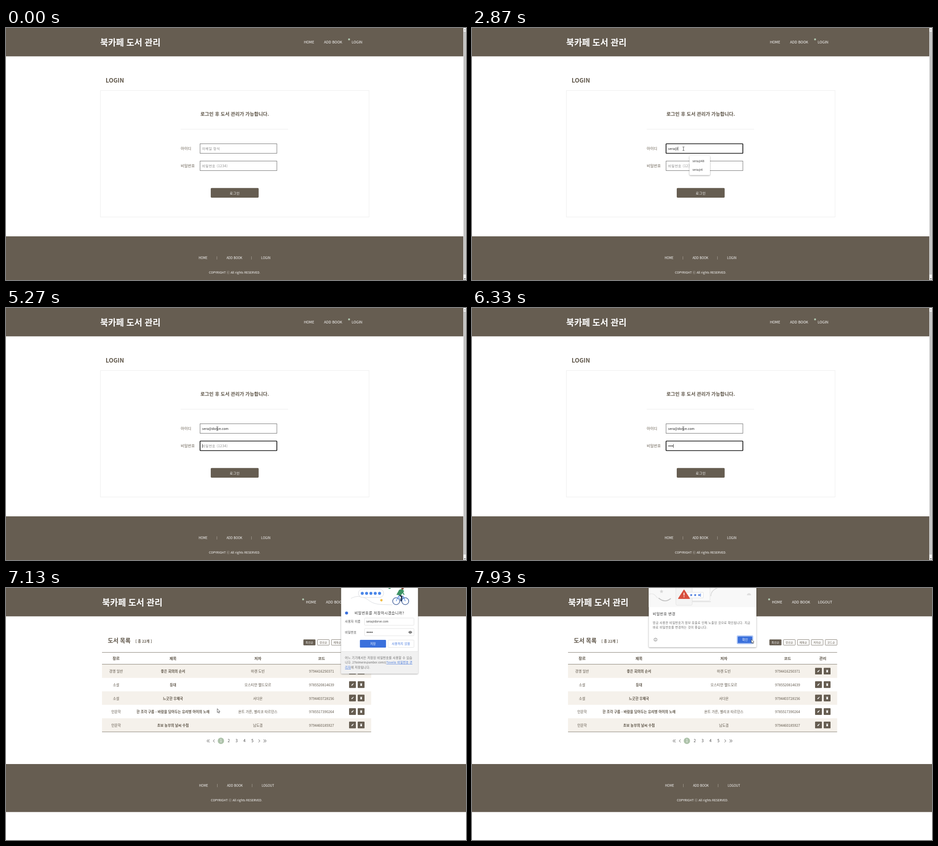
These frames come from a looping animation (1011 by 554 pixels, 8 s). An HTML page:

```html
<!DOCTYPE html>
<html lang="ko">
<head>
<meta charset="utf-8">
<title>북카페 도서 관리</title>
<style>
html, body { margin: 0; width: 100%; height: 100%; overflow: hidden; background: #fff; }
svg { display: block; width: 100%; height: 100%; }
text { font-family: "Noto Sans CJK KR", "Noto Sans CJK", "Noto Sans", sans-serif; white-space: pre; }
.popup { filter: drop-shadow(0 1px 1.5px #0006); }
</style>
</head>
<body>
<svg id="stage" viewBox="0 0 1011 554" xmlns="http://www.w3.org/2000/svg"></svg>
<script>
const BROWN = '#665d51', INK = '#5d5447', GREEN = '#aec3ab', BLUE = '#3a70dc', GRAY = '#666';
const LOOP = 8000, LOGIN_END = 6600;
const EMAIL = 'sera@dorve.com';

// y is the vertical middle of the glyphs
const text = (x, y, size, str, { fill = INK, weight = 400, anchor = 'start', gap = 0, extra = '' } = {}) =>
  `<text x="${x}" y="${y + size * .37}" font-size="${size}" fill="${fill}" font-weight="${weight}" text-anchor="${anchor}" letter-spacing="${gap}" ${extra}>${str}</text>`;
const centered = (x, y, size, str, opts) => text(x, y, size, str, { anchor: 'middle', ...opts });
const rect = (x, y, w, h, fill, extra = '') =>
  `<rect x="${x}" y="${y}" width="${w}" height="${h}" fill="${fill}" ${extra}/>`;
const circle = (x, y, r, fill, extra = '') => `<circle cx="${x}" cy="${y}" r="${r}" fill="${fill}" ${extra}/>`;
const stroke = (d, color, width = 1, extra = '') =>
  `<path d="${d}" fill="none" stroke="${color}" stroke-width="${width}" ${extra}/>`;
const outline = color => `stroke="${color}" stroke-width="1"`;
const group = (id, content, extra = '') => `<g id="${id}" ${extra}>${content}</g>`;

function header(titleX, navX, lastLink) {
  const links = ['HOME', 'ADD BOOK', lastLink];
  return rect(0, 0, 1011, 62.3, BROWN) +
    text(titleX, 32, 18.96, '북카페 도서 관리', { fill: '#fff', weight: 700 }) +
    links.map((s, i) => centered(navX[i], 31, 7.9, s, { fill: '#fff', weight: 500 })).join('');
}

function footer(top, height, linkX, barX, linkY, copyX, copyY, lastLink) {
  const links = ['HOME', 'ADD BOOK', lastLink];
  return rect(0, top, 1011, height, BROWN) +
    links.map((s, i) => centered(linkX[i], linkY, 6.85, s, { fill: '#fff', weight: 500 })).join('') +
    barX.map(x => rect(x, linkY - 3.5, .7, 7, '#b5afa6')).join('') +
    centered(copyX, copyY, 6.8, 'COPYRIGHT ⓒ All rights RESERVED.', { fill: '#fff', weight: 500 });
}

function loginPage() {
  const label = { fill: '#6b6255', weight: 500 };
  const hint = { fill: '#858585', gap: .55 };
  return header(207, [666, 719, 771.5], 'LOGIN') +
    text(219, 115, 13, 'LOGIN', { weight: 700 }) +
    rect(207.5, 137.5, 590.5, 278, '#fff', outline('#eee')) +
    centered(502.5, 189, 10.53, '로그인 후 도서 관리가 가능합니다.', { weight: 700 }) +
    rect(384, 222, 236, 1, '#eee') +
    text(384, 265, 8.43, '아이디', label) + text(384, 303, 8.43, '비밀번호', label) +
    rect(426.5, 254.5, 168.8, 21, '#fff', 'id="idBox"') +
    rect(426.5, 292.5, 168.8, 21, '#fff', 'id="pwBox"') +
    text(431, 265.3, 7.37, '이메일 형식', { ...hint, extra: 'id="idHint"' }) +
    text(431, 303.3, 7.37, '비밀번호 (1234)', { ...hint, extra: 'id="pwHint"' }) +
    text(431, 265.3, 7.37, '', { fill: '#222', extra: 'id="idText"' }) +
    [0, 1, 2, 3].map(i => circle(432.6 + i * 2.75, 303.3, 1.1, '#222', 'class="pwDot"')).join('') +
    rect(450, 351.7, 105.3, 21.3, BROWN, 'rx="2"') +
    centered(502.8, 363, 7.37, '로그인', { fill: '#fff', gap: .55 }) +
    rect(0, 0, .8, 8.5, '#222', 'id="caret"') +
    footer(458, 96, [433, 502, 571], [463.2, 539.2], 505.5, 502.5, 537.8, 'LOGIN') +
    rect(1005, 0, 6, 554, '#f1f1f1') + rect(1005.6, 8, 5, 534, '#c1c1c1') +
    '<path d="M1006.3 5l2-2.5 2 2.5z" fill="#a3a3a3"/><path d="M1006.3 550.5l2 2.5 2-2.5z" fill="#505050"/>' +
    group('historyFull', suggestions(95, ['pmo@tulve', '27tolmerin@dorve.com', '48@7305',
      'sorin4630@pelu.com', 'sera@48', '27tolmerin@dorvel.com'])) +
    group('historyShort', suggestions(45, ['sera@48', 'sera@4']));
}

const suggestions = (width, items) =>
  rect(478, 281, width, items.length * 19 + 4.5, '#fff', 'rx="2" class="popup"') +
  items.map((s, i) => text(484.5, 293 + i * 19, 6.5, s, { fill: '#333' })).join('');

function rowIcons(y) {
  return [754, 773].map(x => rect(x, y, 15, 14.7, BROWN, 'rx="1.2"')).join('') +
    stroke(`M759.5 ${y + 9.3}l3.1 -3.1M763.1 ${y + 5.7}l.7 -.7`, '#fff', 1.9) +
    rect(778.8, y + 5.6, 3.6, 4.6, '#fff', 'rx=".5"') + rect(778.3, y + 4.4, 4.6, .8, '#fff');
}

function listPage() {
  const columns = [242, 367, 553.5, 693.5, 771];
  const books = [
    ['경영 일반', '좋은 회의의 순서', '마렌 도빈', '9794416250371'],
    ['소설', '등대', '오스티안 펠드모르', '9785520814639'],
    ['소설', '느긋한 우체국', '서다온', '9794403728156'],
    ['인문학', '한 조각 구름 - 바람을 담아두는 유리병 아이의 노래', '욘트 가른, 벨리코 타르민스', '9785517390264'],
    ['인문학', '초보 농부의 날씨 수첩', '남도겸', '9794460185927'],
  ];
  const sorts = ['최신순', '장르순', '제목순', '저자순', '코드순'];
  const chevron = (x, dir) => stroke(`M${x + 1.4 * dir} 333l${-2.8 * dir} 3.2 ${2.8 * dir} 3.2`, '#444', .9);
  return header(211.3, [670.5, 723.2, 776], 'LOGOUT') +
    text(223.8, 115.2, 12.64, '도서 목록', { weight: 700 }) +
    text(284.6, 117.3, 7.8, '[ 총 22개 ]', { weight: 700 }) +
    sorts.map((s, i) => {
      const x = 654 + i * 30.6;
      return rect(x, 113.4, 25.8, 12.3, i ? '#fff' : BROWN, `rx="1" stroke="${BROWN}" stroke-width=".8"`) +
        centered(x + 12.9, 119.7, 6.2, s, { fill: i ? INK : '#fff' });
    }).join('') +
    columns.map((x, i) => centered(x, 155.2, 8.43, ['장르', '제목', '저자', '코드', '관리'][i], { weight: 700 })).join('') +
    books.map((book, i) => {
      const top = 168 + i * 29.6;
      return (i % 2 ? '' : rect(211, top, 591.5, 29.6, '#f5f1eb')) +
        book.map((s, c) => centered(columns[c], top + 15.5, 7.65, s, { weight: c === 1 ? 700 : 400 })).join('') +
        rowIcons(top + 7.4);
    }).join('') +
    [141.2, 167.2, 315.8].map(y => rect(211, y, 591.5, .9, '#7b7367')).join('') +
    circle(472.3, 336, 7, GREEN) +
    [1, 2, 3, 4, 5].map(n => centered(455 + n * 17.3, 336.2, 8.43, n, { fill: n > 1 ? '#444' : '#fff' })).join('') +
    [443, 446, 457].map(x => chevron(x, 1)).join('') +
    [556.5, 567.5, 570.5].map(x => chevron(x, -1)).join('') +
    footer(387, 105.5, [434.2, 503, 575.7], [464.3, 540.6], 434.3, 506.7, 466.2, 'LOGOUT');
}

function savePopup() {
  const small = { fill: GRAY, gap: .35 }, link = { fill: BLUE, gap: .35, extra: 'text-decoration="underline"' };
  const field = y => rect(788, y, 108.7, 16, '#fff', `rx="1.5" stroke="#dcdcdc" stroke-width=".8"`);
  return rect(736.5, -4, 169, 192.3, '#fff', 'rx="2" class="popup"') +
    rect(736.5, 139.5, 169, 48.8, '#f1f1f1') + rect(736.5, 139.3, 169, .7, '#ddd') +
    stroke('M758 23C775 14 788 20 800 29S830 36 849 37', '#dadce0', 1) +
    rect(774.5, 2.5, 55.5, 18.3, '#fff', `rx="9" ${outline('#dadce0')}`) +
    [0, 1, 2, 3, 4].map(i => circle(783 + i * 9.5, 11.8, 3.3, '#4a86e8')).join('') +
    rect(822.7, 24.5, 4.6, 4.6, '#f2bd42', 'transform="rotate(25 825 27)"') +
    circle(843, -1, 3, '#3d8f63') +
    [857.5, 877.5].map(x => circle(x, 29, 7.6, 'none', 'stroke="#2d4f91" stroke-width="1.3"')).join('') +
    stroke('M857.5 29l5 -11h11l4 11M863 19l5.5 10 5.5 -10', '#4a86e8', 1.2) +
    stroke('M863 14l7 5 -2 10', '#26334d', 3) +
    '<path d="M858 15l6-11 7-2 4 5-7 9z" fill="#3d9465"/>' +
    stroke('M870 6l5 9', '#3d9465', 2) + circle(871.5, 1, 2.6, '#8a5a44') +
    circle(748.5, 55, 3.3, BLUE) +
    text(766, 55, 8, '비밀번호를 저장하시겠습니까?', { fill: '#333', gap: .5 }) +
    text(745, 73.7, 6.6, '사용자 이름', { fill: '#444', gap: .35 }) +
    text(745, 97.2, 6.6, '비밀번호', { fill: '#444', gap: .25 }) +
    field(66) + field(89) + text(791.8, 74, 6.15, EMAIL, { fill: '#333' }) +
    [0, 1, 2, 3].map(i => circle(794 + i * 3.5, 97.3, 1.2, '#333')).join('') +
    '<path d="M884.3 97.2q4.2 -6 8.4 0q-4.2 6 -8.4 0z" fill="#555"/>' +
    circle(888.5, 97.2, 1.7, '#555', 'stroke="#fff" stroke-width=".7"') +
    rect(777.8, 114, 57.4, 17, BLUE, 'rx="1.5"') + centered(806.5, 122.4, 6.6, '저장', { fill: '#fff' }) +
    rect(839.7, 114.4, 57, 16.3, '#fff', 'rx="1.5" stroke="#dcdcdc" stroke-width=".8"') +
    centered(868.2, 122.4, 6.6, '사용하지 않음', { fill: BLUE, gap: .35 }) +
    text(745, 153.4, 6.6, '어느 기기에서든 저장된 비밀번호를 사용할 수 있습', small) +
    text(745, 164, 6.4, '니다. ', small) + text(761, 164, 6, '27tolmerin@ambor.com의', { fill: GRAY }) +
    text(836, 164, 6.4, 'Tovelo 비밀번호 관', link) +
    text(745, 174.5, 6.6, '리자', link) + text(758, 174.5, 6.6, '에 저장됩니다.', small);
}

function leakAlert() {
  const body = { fill: GRAY, gap: .35 };
  return rect(388.5, -4, 236.5, 134.3, '#fff', 'rx="2" class="popup"') + rect(388.5, 0, 236.5, 42, '#f8f8f8') +
    centered(416.5, 12.5, 18, '*', { fill: '#d4d4d4', weight: 700 }) +
    stroke('M389 14c10 -4 13 2 19 8', '#e3e3e3', 1.2) + stroke('M410 22q14 12 27 1', '#c4c4c4', 2) +
    rect(448, -4, 36, 42, '#f4f4f4', `rx="3" ${outline('#e4e4e4')}`) +
    rect(484, -4, 39, 32, '#fbfbfb', `rx="2" ${outline('#e4e4e4')}`) +
    stroke('M484 30h41M525 18q0 -12 14 -18', '#d0d0d0', 1.2) +
    '<path d="M604 16q1 -5 5 -4.500q4 0 4.500 4.500z" fill="#dedede"/>' +
    rect(470, 9.5, 38.5, 12.3, '#fff', `rx="1.5" ${outline('#e2e2e2')}`) +
    text(478.5, 18, 13, '***', { fill: BLUE, weight: 700, gap: 2.2 }) + rect(502, 12, 1, 7, BLUE) +
    '<path d="M466 4.500L478 23H454z" fill="#d8503f" stroke="#d8503f" stroke-width="2" stroke-linejoin="round"/>' +
    rect(465.1, 10.5, 1.8, 6, '#fff') + circle(466, 19.3, 1.1, '#fff') +
    text(397.3, 57, 8, '비밀번호 변경', { fill: '#333', gap: .5 }) +
    text(397.3, 76.2, 6.6, '방금 사용한 비밀번호가 정보 유출로 인해 노출된 것으로 확인됩니다. 지금', body) +
    text(397.3, 86.7, 6.6, '바로 비밀번호를 변경하는 것이 좋습니다.', body) +
    circle(403.3, 113.5, 3.4, 'none', 'stroke="#666" stroke-width=".8"') +
    rect(402.9, 112.8, .8, 2.6, GRAY) + rect(402.9, 111.3, .8, .8, GRAY) +
    rect(582.7, 104.9, 34.6, 17.6, '#fff', 'rx="2.5" stroke="#8fb1f2" stroke-width="1.4"') +
    rect(584, 106.2, 32, 15, BLUE, 'rx="1.5"') + centered(600, 113.5, 6.8, '확인', { fill: '#fff' });
}

document.getElementById('stage').innerHTML =
  group('login', loginPage()) + group('list', listPage()) + circle(754, 25, 2.2, GREEN, 'id="navDot"') +
  group('save', savePopup()) + group('leak', leakAlert()) +
  group('arrow', '<path d="M0 0V8.600L2 6.900 3.300 9.900 4.800 9.200 3.500 6.400H6z" fill="#fff" stroke="#222" stroke-width=".7"/>') +
  group('beam', stroke('M-2 -4h1.500l.5 .5 .5 -.5h1.500M0 -3.500v7M-2 4h1.500l.5 -.5 .5 .5h1.500', '#222', .8));

const $ = id => document.getElementById(id);
const pwDots = document.querySelectorAll('.pwDot');
const show = (el, on) => el.setAttribute('visibility', on ? 'visible' : 'hidden');
const fade = (el, amount) => { el.style.opacity = amount; show(el, amount > 0); };
const within = (t, from, to) => t >= from && t < to;
const ramp = (t, from, to) => Math.min(1, Math.max(0, (t - from) / (to - from)));
const ease = p => p * p * (3 - 2 * p);

// times at which each next character is on screen
const emailTimes = [1530, 1670, 1800, 2070, 2870, 3800, 3930, 4070, 4200, 4470, 4670, 4670, 4800, 5000];
const passwordTimes = [5800, 5930, 6130, 6330];
const typedCount = (times, t) => times.filter(at => t >= at).length;

const pointerPath = [
  [270, 560, 17], [800, 465, 265.5], [LOGIN_END, 464.3, 265.2],
  [7200, 464.3, 265.2], [7530, 661, 129], [7600, 661, 129], [7930, 614, 112.5],
];
function pointerAt(t) {
  const i = pointerPath.findIndex(p => p[0] > t);
  if (i < 0) return pointerPath.at(-1).slice(1);
  const [a, b] = [pointerPath[i - 1], pointerPath[i]];
  const p = ease(ramp(t, a[0], b[0]));
  return [1, 2].map(k => a[k] + (b[k] - a[k]) * p);
}

function setFocus(box, focused) {
  box.setAttribute('stroke', focused ? '#111' : '#777');
  box.setAttribute('stroke-width', focused ? 1.7 : 1);
  box.setAttribute('rx', focused ? 1 : 0);
}

function drawLogin(t) {
  const onPassword = t >= 5270, onId = t >= 800 && !onPassword;
  const emailCount = typedCount(emailTimes, t), dotCount = typedCount(passwordTimes, t);
  setFocus($('idBox'), onId);
  setFocus($('pwBox'), onPassword);
  $('idText').textContent = EMAIL.slice(0, emailCount);
  show($('idHint'), !emailCount && t < LOGIN_END);
  show($('pwHint'), !dotCount && t < LOGIN_END);
  pwDots.forEach((dot, i) => show(dot, i < dotCount && t < LOGIN_END));

  const caretOff = within(t, 2600, 2870) || within(t, 3400, 3800);
  const caretX = onPassword ? 431 + dotCount * 2.8 : 431 + (emailCount && $('idText').getComputedTextLength());
  $('caret').setAttribute('x', caretX);
  $('caret').setAttribute('y', onPassword ? 299 : 261);
  show($('caret'), (onId || onPassword) && !caretOff && t < LOGIN_END);
  fade($('historyFull'), within(t, 1130, 1600) ? (t < 1200 ? .5 : 1) : 0);
  fade($('historyShort'), within(t, 1600, 3870) ? 1 : 0);
}

function render(t) {
  const loggedIn = t >= LOGIN_END;
  $('login').style.display = loggedIn ? 'none' : '';
  $('list').style.display = loggedIn ? '' : 'none';
  if (!loggedIn) drawLogin(t);
  $('navDot').setAttribute('cx', 754 - 101 * ease(ramp(t, LOGIN_END, 6930)));
  fade($('save'), ramp(t, 7040, 7130) * (1 - ramp(t, 7270, 7350)));
  fade($('leak'), ramp(t, 7270, 7400));

  const [x, y] = t < 270 ? [0, 0] : pointerAt(t);
  const overInput = !loggedIn && y > 254;
  for (const id of ['arrow', 'beam']) $(id).setAttribute('transform', `translate(${x} ${y})`);
  show($('arrow'), t >= 270 && !overInput);
  show($('beam'), overInput);
}

const start = performance.now();
function tick() {
  render((performance.now() - start) % LOOP);
  requestAnimationFrame(tick);
}
tick();
</script>
</body>
</html>
```
